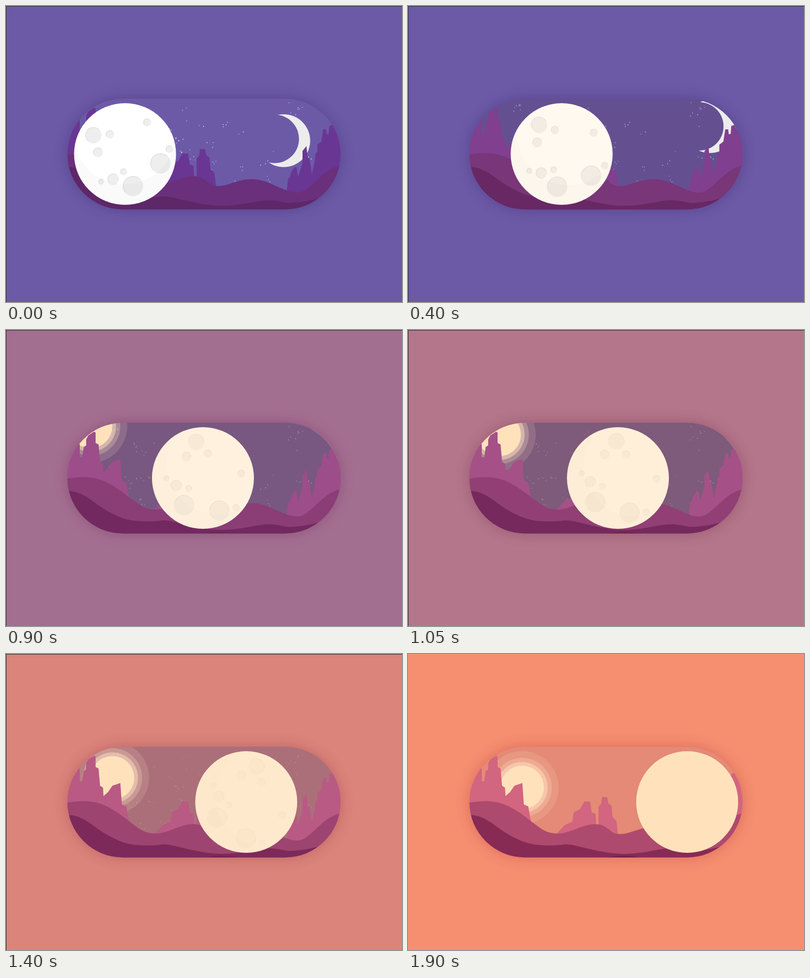
These frames come from a looping animation (800x600 px, 1.95 s). An HTML page:

```html
<!DOCTYPE html>
<html lang="en">
<head>
<meta charset="utf-8">
<title>Night to day switch</title>
<style>
html, body { margin: 0; width: 100%; height: 100%; overflow: hidden; }
svg { display: block; width: 800px; height: 600px; }
</style>
</head>
<body>
<svg viewBox="0 0 800 600">
  <defs>
    <clipPath id="pill"><rect x="124" y="188" width="552" height="224.5" rx="112.25"/></clipPath>
    <filter id="blur" x="-20%" y="-40%" width="140%" height="180%"><feGaussianBlur stdDeviation="14"/></filter>
  </defs>
  <rect id="page" width="800" height="600"/>
  <path id="edge" d="M0 0H800V1H1V600H0Z" fill="#29292e"/>
  <rect id="shadow" x="124" y="188" width="552" height="224.5" rx="112.25" opacity=".25" filter="url(#blur)"/>
  <g clip-path="url(#pill)">
    <rect id="sky" x="120" y="184" width="560" height="233"/>
    <circle id="moon" r="53.5" fill="#ececec"/>
    <circle id="moonShade" r="49.1"/>
    <g id="stars" fill="#fff"></g>
    <g id="sun" fill="#ffe2c4">
      <circle r="74" opacity=".15"/>
      <circle r="60" opacity=".25"/>
      <circle r="51.5" opacity=".5"/>
      <circle r="44" fill="#ffe2bb"/>
    </g>
    <g id="rocks">
      <path d="M120 250L149 231V258H154L157 237L162 234V222L166 214L178 206L181 208V229L187 232L190 267L196 271L197 288L206 280L215 267L231 261.5L234 305L243 309L250 350V400H120Z"/>
      <path d="M300 364L318 346L332 340L335 321L348 314L356 299H368L371 321L379 324L380 346H385V309L390 304L392 290H402L405 303L411 307L413 330L421 338L424 364V390H300Z"/>
      <path d="M567 375L570 350L574 346L576 337L583 327H587L590 347L599 318V294L607 284L609 306L613 309L618 341L624 313L625 299L629 296V281L637 275L641 250H647L648 260L652 259L653 243L680 235V400H567Z"/>
    </g>
    <path id="backHill" d="M120 302C170 293 195 300 230 325S275 364 302 364S350 345 378 345S405 365 428 365S465 351 498 351S560 378 588 378S635 330 680 322V420H120Z"/>
    <path id="frontHill" d="M120 326C158 326 173 349 205 367S255 388 285 388S305 386 322 386S390 405 435 405S505 394 530 394S560 400 580 399S640 392 680 372V420H120Z"/>
    <path id="mound" fill="#6f2048" d="M400 413Q435 405 470 413Z"/>
    <g id="knob">
      <circle id="disc" r="103"/>
      <g id="craters">
        <path d="M-101.7-16.2A103 103 0 1 0 99.7-25.8A103 103 0 0 1-101.7-16.2Z" opacity=".018"/>
      </g>
    </g>
  </g>
</svg>
<script>
const LOOP = 1950, STEP = 50, TRAVEL = 1850;
const $ = id => document.getElementById(id);

function add(parent, tag, attrs) {
  const el = document.createElementNS("http://www.w3.org/2000/svg", tag);
  for (const name in attrs) el.setAttribute(name, attrs[name]);
  parent.appendChild(el);
}

const lerp = (a, b, k) => a + (b - a) * k;
const progress = (t, from, to) => Math.max(0, Math.min(1, (t - from) / (to - from)));
const rgb = hex => [1, 3, 5].map(i => parseInt(hex.slice(i, i + 2), 16));
const mix = (a, b, k) => {
  const end = rgb(b);
  return `rgb(${rgb(a).map((v, i) => Math.round(lerp(v, end[i], k)))})`;
};

function skyColor(t) {
  if (t < 400) return mix("#6c5aa7", "#645091", t / 400);
  if (t < 1050) return mix("#645091", "#7e5a7b", progress(t, 400, 1050));
  return mix("#7e5a7b", "#e48a76", progress(t, 1050, TRAVEL));
}

// Position and radius are relative to the middle of the disc.
function crater(x, y, r) {
  const rim = r - .7, d = rim * Math.SQRT1_2;
  add($("craters"), "circle", { cx: x, cy: y, r, fill: "#283028", opacity: .08 });
  add($("craters"), "path", {
    d: `M${x - d} ${y + d}A${rim} ${rim} 0 0 1 ${x + d} ${y - d}`,
    fill: "none", stroke: "#302820", "stroke-width": 1.5, opacity: .07
  });
}
crater(-64, -38, 16.5);
crater(-30.5, -40, 8.5);
crater(44.5, -64, 8);
crater(-54.5, -3.5, 10);
crater(71.5, 19, 20.5);
crater(89.5, -10, 7.5);
crater(-3, 36, 7);
crater(-24, 51, 11.5);
crater(-48, 56, 6);
crater(16, 65, 20.5);

let seed = 29;
const random = () => (seed = seed * 16807 % 2147483647) / 2147483647;

// Stars stand in small loose groups; a few of them glow.
function starGroup(glows) {
  const x = lerp(185, 620, random()), y = lerp(192, 350, random());
  const count = 1 + Math.floor(random() * 4);
  for (let i = 0; i < count; i++) {
    add($("stars"), "circle", {
      cx: x + random() * 16, cy: y + random() * 14, r: .9, opacity: lerp(.5, .95, random())
    });
  }
  if (glows) add($("stars"), "circle", { cx: x, cy: y, r: 2.3, opacity: .35 });
}
for (let i = 0; i < 54; i++) starGroup(i % 12 === 0);

const fill = (id, color) => $(id).setAttribute("fill", color);
const move = (id, x, y) => $(id).setAttribute("transform", `translate(${x} ${y})`);
const fade = (id, value) => $(id).setAttribute("opacity", value);

function draw(t) {
  const p = progress(t, 0, TRAVEL);
  const dawn = progress(t, 400, 1650);
  const sunrise = Math.min(t, 1575) - 1575;
  const sky = skyColor(t);

  fill("page", mix("#6c5aa7", "#f58f70", dawn));
  fill("shadow", mix("#201040", "#901020", dawn));
  fade("edge", dawn < 1 ? 1 : 0);

  fill("sky", sky);
  fill("moonShade", sky);
  fill("rocks", mix("#6a3694", "#d2657f", p));
  fill("backHill", mix("#6a307b", "#ae4a6e", p));
  fill("frontHill", mix("#5e2768", "#872b55", p));
  fade("mound", p);
  fade("stars", lerp(.9, .06, p));

  // The shade lags behind, so the crescent thickens as it sets.
  move("moon", 561 + t * .123, 273 - t * .071);
  move("moonShade", 542.8 + t * .114, 269.4 - t * .0635);
  move("sun", 230.5 + sunrise * .0884, 270.5 + sunrise * .1116);

  move("knob", lerp(240.5, 564, p), 300);
  $("craters").setAttribute("transform", `rotate(${p * 100})`);
  fill("disc", mix("#ffffff", "#ffe2bb", p));
  fade("craters", 1 - p);
}

const start = performance.now();
function tick() {
  const t = (performance.now() - start) % LOOP;
  draw(Math.floor(t / STEP) * STEP);
  requestAnimationFrame(tick);
}
tick();
</script>
</body>
</html>
```
